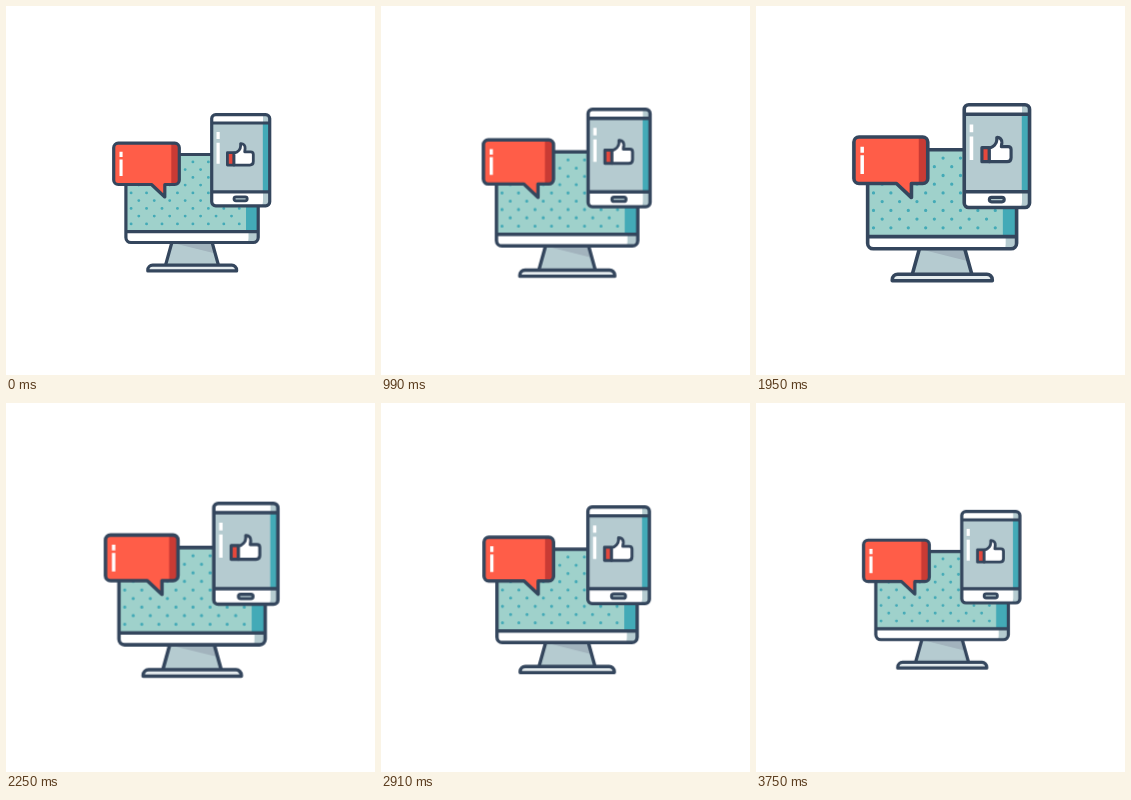
Write an HTML page without scripts that moves like this. It is 369 by 369 pixels and loops after 3.78 s.

```html
<!DOCTYPE html>
<html lang="en">
<head>
<meta charset="utf-8">
<title>Social devices</title>
<style>
  html, body { margin: 0; width: 100%; height: 100%; overflow: hidden; background: #fff; }
  svg { display: block; width: 100%; height: 100%; }
  .icon {
    transform-origin: 185.75px 186.5px;
    animation: breathe 3780ms linear infinite;
  }
  @keyframes breathe {
    0%, 100% { transform: scale(1); }
    50% { transform: scale(1.13); }
  }
  .line { fill: none; stroke: #34465d; stroke-width: 3.2; stroke-linejoin: round; }
  .thin { stroke-width: 2.8; }
  .white { fill: #fff; }
  .gray { fill: #b5cbd0; }
  .shade { fill: #a2b3bd; }
  .teal { fill: #43aab7; }
  .mint { fill: #9fd1cb; }
  .red { fill: #ff5d48; }
  .dark-red { fill: #c93b34; }
  .dots { fill: none; stroke: #43aab7; stroke-width: 2.9; stroke-linecap: round; stroke-dasharray: 0 15.45; }
</style>
</head>
<body>
<svg viewBox="0 0 369 369">
  <defs>
    <clipPath id="monitor-clip"><rect x="119.9" y="148.5" width="132.3" height="88" rx="5"/></clipPath>
    <clipPath id="phone-clip"><rect x="205.7" y="108.6" width="58" height="91.2" rx="4"/></clipPath>
    <clipPath id="bubble-clip"><rect x="107.7" y="137.2" width="65.6" height="41.3" rx="4.5"/></clipPath>
  </defs>
  <g class="icon">
    <!-- stand -->
    <path class="gray" d="M166 236H206L212 259H160Z"/>
    <path class="shade" d="M167 237H206.5L209.3 247.5Z"/>
    <path class="line" d="M166 236L159.6 259M206 236L212.4 259"/>
    <path class="line" fill="none" style="fill:#e6edef" d="M141.8 264.9v-1a4.8 4.8 0 0 1 4.8-4.8h79.2a4.8 4.8 0 0 1 4.8 4.8v1z"/>

    <!-- monitor -->
    <g clip-path="url(#monitor-clip)">
      <rect class="mint" x="118" y="147" width="136" height="79"/>
      <path class="dots" d="M125.1 155.9H239M125.1 171.4H239M125.1 186.9H239M125.1 202.4H239M125.1 217.9H239"/>
      <path class="dots" d="M132.8 163.6H239M132.8 179.1H239M132.8 194.6H239M132.8 210.1H239"/>
      <rect class="teal" x="240" y="147" width="14" height="79"/>
      <rect class="white" x="118" y="225.8" width="136" height="13"/>
      <path class="gray" d="M242.5 226H254V238H240.8Q242.5 236 242.5 232Z"/>
    </g>
    <path class="line" d="M120 225.7H252.2"/>
    <rect class="line" x="119.9" y="148.5" width="132.3" height="88" rx="5"/>

    <!-- speech bubble -->
    <path class="red" d="M145.3 177L158.8 191V177Z"/>
    <g clip-path="url(#bubble-clip)">
      <rect class="red" x="107" y="136" width="67" height="43"/>
      <rect class="dark-red" x="165.3" y="136" width="9" height="43"/>
    </g>
    <path class="white" d="M113.5 145.8h3.1v5.3h-3.1zM113.5 153.4h3.1v16.6h-3.1z"/>
    <path class="line" d="M112.2 137.2H168.8a4.5 4.5 0 0 1 4.5 4.5V174a4.5 4.5 0 0 1-4.5 4.5H158.8V191L145.5 178.5H112.2a4.5 4.5 0 0 1-4.5-4.5V141.7a4.5 4.5 0 0 1 4.5-4.5Z"/>

    <!-- phone -->
    <g clip-path="url(#phone-clip)">
      <rect class="white" x="205" y="108" width="59" height="92"/>
      <path class="gray" d="M205 117h59v69h-59zM257 108h7v9h-7zM257 186h7v14h-8.5q1.5-2 1.5-5z"/>
      <rect class="teal" x="256.8" y="117" width="8" height="69"/>
    </g>
    <path class="white" d="M210.5 126h3.2v7h-3.2zM210.5 136.7h3.2v21h-3.2z"/>
    <path class="line" d="M205.7 117H263.7M205.7 185.8H263.7"/>
    <rect class="line" x="205.7" y="108.6" width="58" height="91.2" rx="4"/>
    <rect class="line thin gray" style="fill:#b5cbd0" x="228" y="190.8" width="13.2" height="4" rx="2"/>

    <!-- thumbs up -->
    <rect class="line thin" style="fill:#e5483c" x="221.4" y="146.7" width="6.6" height="12.4"/>
    <path class="line thin" style="fill:#fff" d="M228 147.2C231.5 146.2 234.5 143.4 234.6 140V137.6C237.6 137.4 239.3 139.6 239.1 142.3L238.7 145.8H244.6Q247.3 145.8 247.3 148.4V155.6Q247.3 159.1 243.8 159.1H228Z"/>
  </g>
</svg>
</body>
</html>
```
